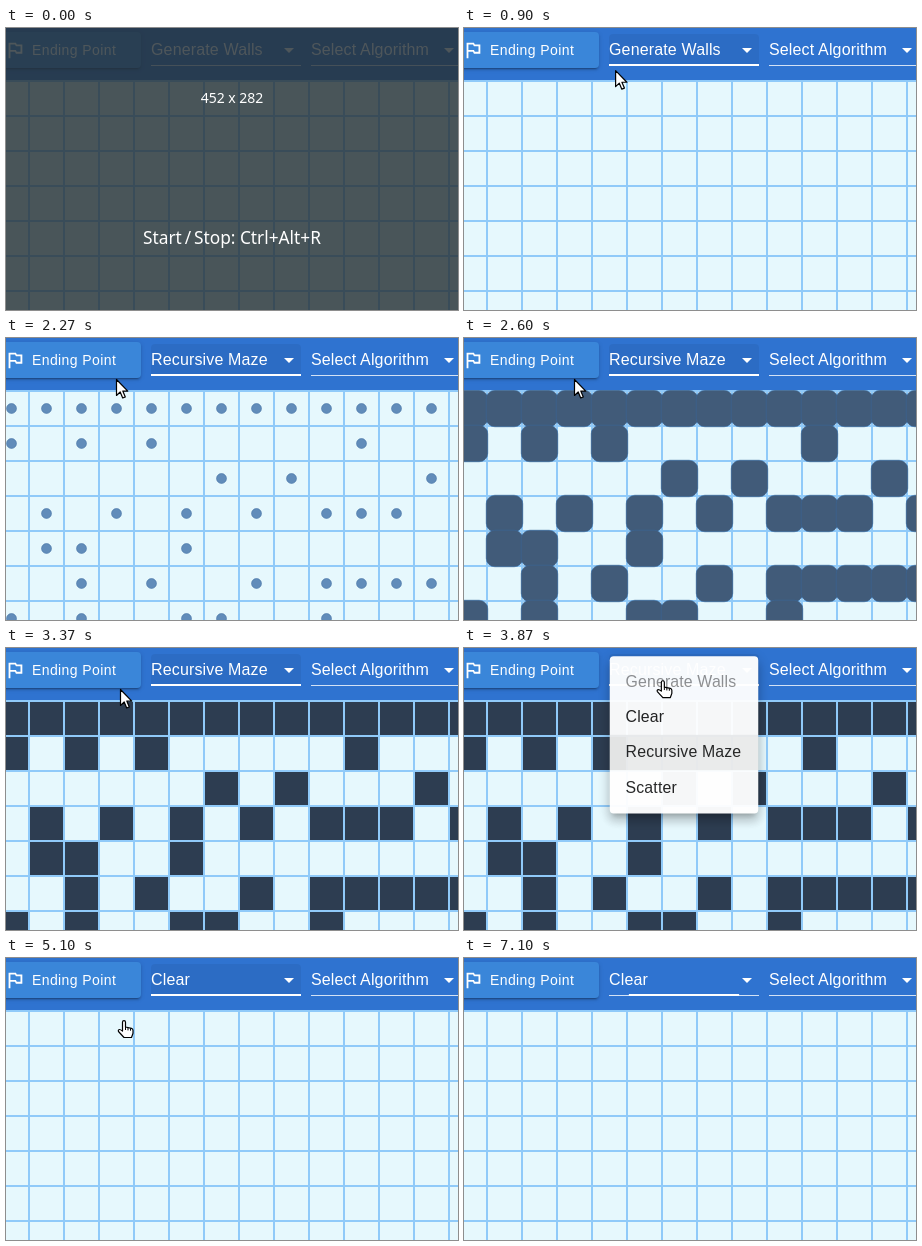
An HTML page with a canvas for the animation above (7130 ms loop, 452x282 px).

```html
<!DOCTYPE html>
<html lang="en">
<head>
<meta charset="utf-8">
<title>Maze wall picker</title>
<style>
  html, body { margin: 0; width: 100%; height: 100%; overflow: hidden; }
  body { position: relative; font: 16px/36px "Liberation Sans", Arial, sans-serif; letter-spacing: .15px; white-space: nowrap; }
  body *, .select::before { position: absolute; box-sizing: border-box; }
  header { left: 0; top: 0; width: 452px; height: 52px; background: #2f73d0; color: #fff; overflow: hidden; }
  .button { left: -20px; top: 4px; width: 155px; height: 36px; padding-left: 46px; border-radius: 4px; background: #3a86d9;
    font-size: 14px; letter-spacing: .4px;
    box-shadow: 0 3px 1px -2px #0003, 0 2px 2px #00000024, 0 1px 5px #0000001f; }
  .button svg { left: 18px; top: 7px; }
  .select { top: 6px; width: 150px; height: 32px; line-height: 32px; border-radius: 4px 4px 0 0; }
  .select::before { content: ""; left: 0; top: 31px; width: 100%; height: 1px; background: #ffffffc8; }
  .select i { left: 133px; top: 14px; border: 5px solid transparent; border-top-color: #fff; border-bottom: 0; }
  #bar { left: 0; top: 30px; width: 100%; height: 2px; background: #fff; }
  #menu { left: 145px; top: 8px; width: 150px; height: 160px; padding: 8px 0; border-radius: 4px; background: #fff;
    color: #000000de; transform-origin: 50% 14px;
    box-shadow: 0 5px 5px -3px #0003, 0 8px 10px 1px #00000024, 0 3px 14px 2px #0000001f; }
  #menu div { position: relative; height: 36px; padding-left: 16px; }
  #menu div:first-child { opacity: .5; }
  #cursor { left: 0; top: 0; overflow: visible; fill: #fff; stroke: #000; stroke-width: 1.2; stroke-linejoin: round; }
  #overlay { left: 0; top: 0; width: 452px; height: 282px; background: rgba(38, 47, 52, .81);
    color: #fff; font-family: "Noto Sans", sans-serif; letter-spacing: 0; text-align: center; }
  #overlay div { width: 100%; }
</style>
</head>
<body>
<canvas id="grid" width="452" height="282" style="left:0;top:0"></canvas>
<header>
  <div class="button">
    <svg width="22" height="22" viewBox="0 0 24 24" fill="#fff"><path d="M14 6l-1-2H5v17h2v-7h5l1 2h7V6h-6zm4 8h-4l-1-2H7V6h5l1 2h5v6z"/></svg>Ending Point
  </div>
  <div class="select" id="walls" style="left:145px"><span id="label"></span><i></i><div id="bar"></div></div>
  <div class="select" style="left:305px">Select Algorithm<i></i></div>
</header>
<div id="menu"><div>Generate Walls</div><div>Clear</div><div>Recursive Maze</div><div>Scatter</div></div>
<svg id="cursor" width="18" height="20">
  <path id="arrow" d="M.5 .5v16l3.7-3.5 2.5 6 2.6-1.1-2.5-5.8h5z"/>
  <g id="hand" transform="translate(-6.5 -1)">
    <path d="M5 10.5V2.2a1.5 1.5 0 0 1 3 0V7l6 1.3q1.5.4 1.5 2v3L14 17.5H6.5L1 11.5q-.6-1.6.8-2 1-.2 3.2 1.6z"/>
    <path d="M8 7v3M10.5 7.8v2.6M13 8.3v2.4" stroke-width="1"/>
  </g>
</svg>
<div id="overlay">
  <div style="top:52px;font-size:14px">452 x 282</div>
  <div style="top:192px;font-size:17.3px">Start&thinsp;/&thinsp;Stop: Ctrl+Alt+R</div>
</div>
<script>
const LOOP = 7130, CELL = 35;
const WALLS_START = 2260, WALLS_TIME = 540, WALLS_CLEARED = 4800;
const MAZE = [
  "##############",
  "#.#.#.....#...",
  "......#.#...#.",
  ".#.#.#.#.###.#",
  ".##..#........",
  "..#.#..#.#####",
  "#.#..##..#....",
];
// Menu openings: fade-in start, ripple start, close start
const MENUS = [
  { open: 1130, press: 1700, close: 1870, selected: 0, x: 203, y: 101 },
  { open: 3650, press: 4690, close: 4770, selected: 2, x: 181, y: 67 },
];
// Pointer stops: time, x, y
const PATH = [
  [830, 136, 46], [1080, 215, 26], [1200, 215, 28], [1530, 206, 96], [1700, 204, 98], [1870, 204, 98],
  [2270, 110, 41], [3369, 110, 41], [3370, 114, 41], [3620, 200, 26], [3760, 200, 27], [4070, 196, 48],
  [4170, 194, 48], [4450, 181, 64], [4700, 181, 64], [5080, 118, 63], [5700, 118, 63], [5790, 125, 58], [6100, -16, 22],
];

const $ = id => document.getElementById(id);
const ctx = $("grid").getContext("2d");
const items = [...$("menu").children];
const mix = (a, b, k) => a + (b - a) * k;
const ramp = (t, from, to) => Math.min(1, Math.max(0, (t - from) / (to - from)));
const smooth = k => k * k * (3 - 2 * k);

function drawGrid(t) {
  ctx.fillStyle = "#e6f8fd";
  ctx.fillRect(0, 0, 452, 282);
  ctx.fillStyle = "#90caf9";
  for (let x = 22; x < 452; x += CELL) ctx.fillRect(x, 52, 2, 230);
  for (let y = 52; y < 282; y += CELL) ctx.fillRect(0, y, 452, 2);
  if (t >= WALLS_START && t < WALLS_CLEARED) drawWalls(ramp(t, WALLS_START, WALLS_START + WALLS_TIME));
}

// Walls pop in as dots, overshoot, then settle into squares.
function drawWalls(p) {
  const scale = p < .62 ? mix(.3, 1.11, smooth(p / .62)) : mix(1.11, 1, smooth((p - .62) / .38));
  const size = 33 * scale, radius = size * Math.min(.5, (1 - p) * .64);
  const [r, g, b] = [[98, 45], [141, 61], [188, 81]].map(([from, to]) => mix(from, to, p));
  ctx.fillStyle = `rgb(${r},${g},${b})`;
  ctx.strokeStyle = "rgba(56,104,158,.5)";
  MAZE.forEach((row, j) => [...row].forEach((cell, i) => {
    if (cell !== "#") return;
    ctx.beginPath();
    ctx.roundRect(CELL * i + 5.5 - size / 2, CELL * j + 70.5 - size / 2, size, size, radius);
    ctx.fill();
    if (p < 1) ctx.stroke();
  }));
}

function pointerAt(t) {
  const next = PATH.findIndex(stop => stop[0] > t);
  if (next < 1) return null;
  const [t0, x0, y0] = PATH[next - 1], [t1, x1, y1] = PATH[next];
  const k = smooth(ramp(t, t0, t1));
  return { x: mix(x0, x1, k), y: mix(y0, y1, k) };
}

function drawPointer(pointer) {
  $("cursor").style.display = pointer ? "" : "none";
  if (!pointer) return;
  const { x, y } = pointer;
  const onBar = y < 53 && (y > 40 || (x > 135 && x < 145));
  $("cursor").style.transform = `translate(${x}px,${y}px)`;
  $("arrow").style.display = onBar ? "" : "none";
  $("hand").style.display = onBar ? "none" : "";
}

function drawMenu(t, pointer) {
  const menu = MENUS.find(m => t >= m.open && t < m.close + 220);
  $("menu").style.display = menu ? "" : "none";
  if (!menu) return;
  const shown = smooth(ramp(t, menu.open, menu.open + 250)) * (1 - smooth(ramp(t, menu.close, menu.close + 220)));
  $("menu").style.opacity = shown;
  $("menu").style.transform = `scale(${mix(.75, 1, shown)},${mix(.5625, 1, shown)})`;
  const row = y => Math.floor((y - 16) / 36);
  const hovered = pointer && pointer.x > 145 ? row(pointer.y) : -1;
  items.forEach((item, i) => {
    const shade = i === menu.selected ? .08 : i === hovered ? .045 : 0;
    item.style.backgroundColor = `rgba(0,0,0,${i === 0 && menu.selected ? 0 : shade})`;
    const pressed = t >= menu.press && i === row(menu.y);
    const radius = mix(8, 95, ramp(t, menu.press, menu.press + 650));
    item.style.backgroundImage = pressed
      ? `radial-gradient(circle at ${menu.x - 145}px ${menu.y - 16 - 36 * i}px, rgba(0,0,0,.14) ${radius - 1}px, transparent ${radius}px)`
      : "none";
  });
}

function drawSelect(t) {
  const focused = t >= 470 && t < 7100;
  const width = focused ? smooth(ramp(t, 440, 610)) : t >= 7100 ? .735 : 0;
  $("label").textContent = t < MENUS[0].close ? "Generate Walls" : t < MENUS[1].close ? "Recursive Maze" : "Clear";
  $("walls").style.backgroundColor = focused ? "rgba(0,0,0,.06)" : "transparent";
  $("bar").style.transform = `scaleX(${width})`;
}

function frame(now) {
  const t = now % LOOP, pointer = pointerAt(t);
  drawGrid(t);
  drawSelect(t);
  drawMenu(t, pointer);
  drawPointer(pointer);
  $("overlay").style.display = t < 30 ? "" : "none";
}

let start;
function tick(now) {
  start ??= now;
  frame(now - start);
  requestAnimationFrame(tick);
}
frame(0);
requestAnimationFrame(tick);
</script>
</body>
</html>
```
